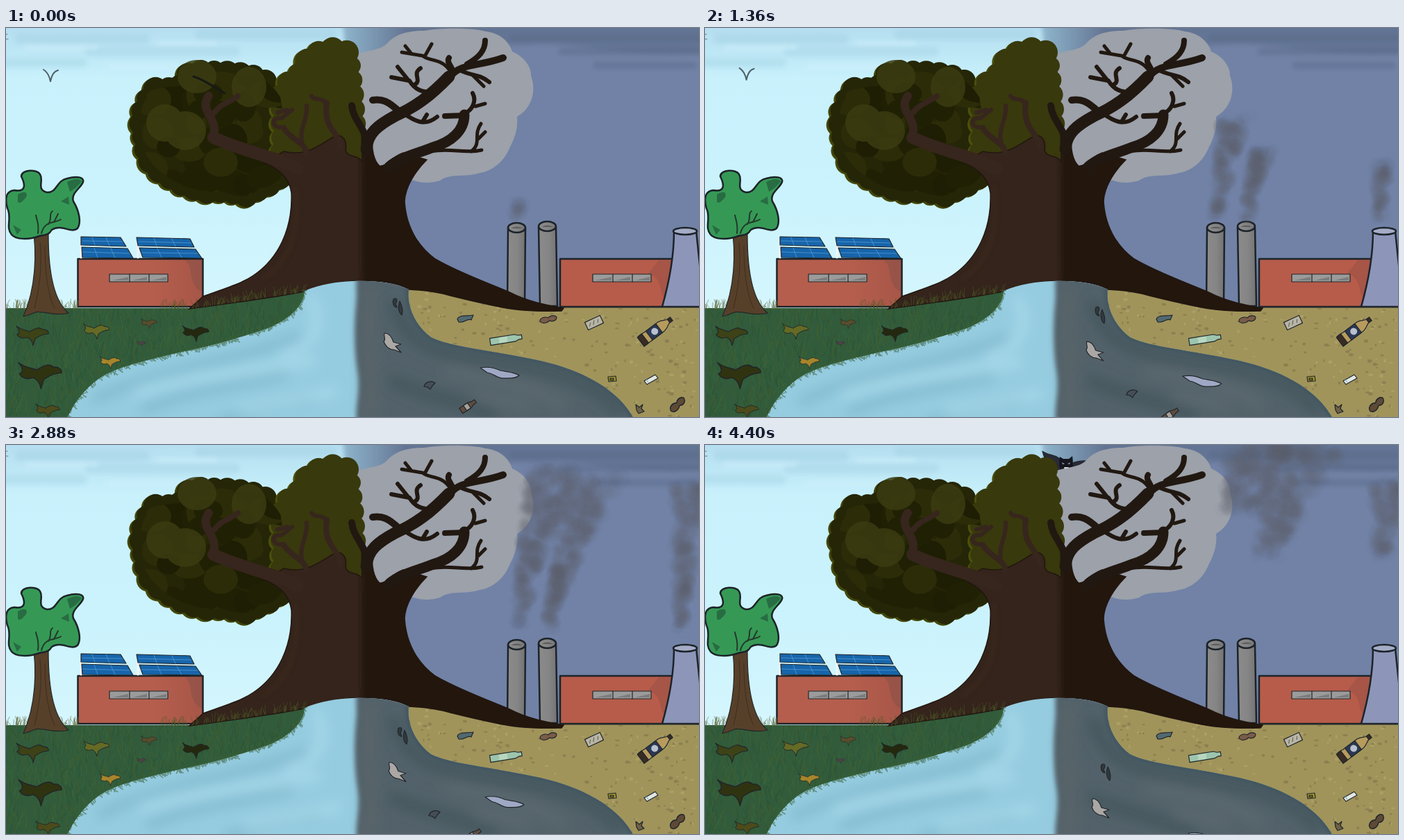
These frames come from a looping animation (998x561 px, 4.48 s). An HTML page with a canvas:

```html
<!DOCTYPE html>
<html lang="en">
<head>
<meta charset="utf-8">
<title>Two sides of a river</title>
<style>
html, body { margin: 0; width: 100%; height: 100%; overflow: hidden; background: #c9f3fd; }
svg, canvas { position: absolute; left: 0; top: 0; width: 998px; height: 561px; }
.ink { stroke: #1c2329; stroke-width: 2.5; stroke-linejoin: round; }
.thin { stroke: #20262a; stroke-width: 1.2; stroke-linejoin: round; }
.line { fill: none; stroke-linecap: round; stroke-linejoin: round; }
.dark { stroke: #211811; }
.bark { stroke: #37261d; }
</style>
</head>
<body>
<svg viewBox="0 0 998 561">
  <defs>
    <filter id="soft" filterUnits="userSpaceOnUse" x="-40" y="-40" width="1080" height="640"><feGaussianBlur stdDeviation="3"/></filter>
    <filter id="haze" filterUnits="userSpaceOnUse" x="-40" y="-40" width="1080" height="640"><feGaussianBlur stdDeviation="9"/></filter>
    <linearGradient id="day" x2="0" y2="1">
      <stop offset="0" stop-color="#b5def0"/><stop offset=".13" stop-color="#c8f1fc"/>
      <stop offset=".45" stop-color="#cbf3fd"/><stop offset=".72" stop-color="#d5f6fd"/>
    </linearGradient>
    <linearGradient id="dusk"><stop stop-color="#8fb6cd"/><stop offset="1" stop-color="#667896"/></linearGradient>
    <linearGradient id="brick"><stop offset=".6" stop-color="#b55e4d"/><stop offset="1" stop-color="#a75648"/></linearGradient>
    <linearGradient id="steel"><stop offset="0" stop-color="#8b8b8b"/><stop offset=".55" stop-color="#858585"/><stop offset="1" stop-color="#737375"/></linearGradient>
    <path id="edge" d="M430 379C430 398 412 418 380 432C335 448 290 460 250 468C190 482 160 490 138 503C112 520 96 545 88 563"/>
    <path id="trunk" d="M264 405L284 387C318 375 340 368 356 357C392 333 413 290 411 238C408 216 395 205 372 194L400 178C430 186 450 170 470 158C482 150 492 160 489 176C492 188 505 182 513 192L512 150L528 158C526 175 530 192 538 199C548 200 552 188 572 180L606 190C588 208 575 230 574 250C576 285 592 314 618 333C650 352 690 366 725 381C752 395 780 400 803 404L800 408C760 409 735 407 715 403C690 398 660 391 640 386C620 380 600 378 580 377C560 365 530 364 500 365C475 366 450 372 430 380C380 390 330 396 264 405Z"/>
    <path id="river" d="M430 379C455 369 475 366 500 365C535 364 560 368 580 377C577 400 588 428 612 446C640 460 690 463 770 480C830 494 880 520 904 563H88C96 545 112 520 138 503C160 490 190 482 250 468C290 460 335 448 380 432C412 418 430 398 430 379Z"/>
    <path id="meadow" d="M0 404H264C330 396 380 390 430 379C430 398 412 418 380 432C335 448 290 460 250 468C190 482 160 490 138 503C112 520 96 545 88 563H0Z"/>
    <path id="beach" d="M580 377C600 377 620 380 640 385C690 396 740 406 800 404H998V563H904C880 520 830 494 770 480C690 463 640 460 612 446C588 428 577 400 580 377Z"/>
    <path id="oak" d="M203 100C200 88 225 86 250 84C255 58 290 58 330 66C360 65 380 75 395 100L408 180C405 215 385 230 365 230C345 252 325 238 305 236C270 238 240 222 220 205C203 190 193 170 197 145C191 130 194 115 203 100Z"/>
    <path id="elm" d="M396 96C398 75 425 70 432 50C448 28 475 25 492 36C500 48 498 70 500 100L507 186L396 188Z"/>
    <clipPath id="inTrunk"><use href="#trunk"/></clipPath>
    <clipPath id="inRiver"><use href="#river"/></clipPath>
    <clipPath id="inMeadow"><use href="#meadow"/></clipPath>
    <clipPath id="inBeach"><use href="#beach"/></clipPath>
    <clipPath id="inOak"><use href="#oak"/></clipPath>
    <path id="leaf" d="M-23-13C-14-6-9-8-4-5C3-9 9-13 15-8C20-9 24-5 23-2C15-2 9 2 4 5L1 15C0 8-4 4-8 3C-14 6-20 3-22-1C-17-3-19-8-23-13Z"/>
    <path id="bow" d="M-12 3C-12-3-4-4 0-2C3-6 10-6 12-3C12 2 6 4 2 2C-2 6-9 7-12 3Z"/>
    <g id="windows"><path class="thin" fill="#9b9b9b" d="M149 355H233V366H149Z"/><path class="line thin" d="M178 355V366M206 355V366"/><path d="M153 364L176 359V364ZM182 364L203 359V364ZM210 364L231 359V364Z" fill="#7c7c7c"/></g>
  </defs>

  <!-- sky -->
  <rect width="998" height="561" fill="url(#day)"/>
  <g filter="url(#soft)">
    <path fill="#7182a6" d="M484 30L560-20H1020V420H500Z"/>
    <path fill="#5d6f8e" d="M570-20H1020V34C900 44 820 20 760 24L570 30Z" opacity=".7"/>
    <path fill="url(#dusk)" d="M484-20H572V48H490Z"/>
    <path class="line" stroke="#536482" stroke-width="10" opacity=".4" d="M730 14H1000M800 34H1010M850 54H990"/>
    <path class="line" stroke="#96c6da" stroke-width="14" opacity=".3" d="M20 16H200M120 34H330M280 10H470M-10 50H110"/>
    <path class="line" stroke="#daf6fd" stroke-width="6" opacity=".4" d="M30 28H130M220 22H300M150 56H260"/>
  </g>
  <path class="line" stroke="#6b7b82" d="M0 9H2M0 16H3"/>

  <g id="peeker">
    <path class="thin" fill="#292a37" d="M486 9C496 16 505 13 512 21L512 48L496 42ZM527 27C536 23 546 22 555 24L546 48H520Z"/>
    <path fill="#15161d" d="M511 17L516 20H524L529 16C531 28 530 40 520 42C510 40 509 28 511 17Z"/>
    <path fill="#8f97a8" d="M514 25L518 27L515 28ZM526 25L522 27L525 28Z"/>
    <path fill="#eee" d="M517 32H524L522 35H518Z"/>
  </g>

  <!-- factories -->
  <rect class="ink" x="103.500" y="333" width="180" height="69" fill="url(#brick)"/>
  <path fill="#8b5148" opacity=".55" d="M258 335C270 345 262 360 275 376L282 380V335Z"/>
  <use href="#windows"/>
  <path class="line" stroke="#f4f4f4" stroke-width="3" d="M108 304V331M190 304V331"/>
  <path class="thin" fill="#1765ab" d="M108 301L165 302L173 315L108 313ZM109 316L175 318L183 332L110 331ZM188 302L265 304L271 316L190 314ZM192 317L273 319L282 332L197 331Z"/>
  <path class="line" stroke="#63abdf" opacity=".6" d="M110 307L168 308M110 323L178 325M191 308L267 310M195 324L276 325M124 302L128 313M144 302L149 314M127 317L132 331M151 318L157 331M213 303L217 314M239 304L244 315M218 318L224 331M246 319L253 331"/>

  <g class="ink" fill="url(#steel)">
    <path d="M723 288L722 400H747L748 288Z"/><ellipse cx="735.500" cy="288" rx="12.500" ry="7"/>
    <path d="M767 287L769 401H794L792 287Z"/><ellipse cx="779.500" cy="286" rx="12.500" ry="7"/>
  </g>
  <path fill="#5e5e60" d="M728 289A8 4 0 0 1 743 289ZM772 287A8 4 0 0 1 787 287Z"/>
  <rect class="ink" x="798" y="333" width="166" height="69" fill="#b75c4a"/>
  <path fill="#9b5047" opacity=".6" d="M940 335H958L948 390C940 380 946 360 925 354Z"/>
  <use href="#windows" x="696"/>
  <path class="ink" fill="#8d96b9" d="M962 293C962 330 954 370 945 402H1002V370L994 293Z"/>
  <ellipse class="ink" cx="978" cy="293" rx="17" ry="5" fill="#a5acc6"/>

  <!-- crowns -->
  <path fill="#9ca1aa" d="M506 37C525 31 540 32 549 22C563 6 585 4 602 4C630-1 675 0 691 5C711 7 725 20 729 34C748 42 757 58 756 69C764 90 758 115 736 128C738 146 731 162 726 171C718 193 699 207 682 209C660 216 640 209 625 220C609 225 590 224 575 214L515 205Z"/>
  <g id="crown"></g>
  <g id="foliage" clip-path="url(#inOak)"></g>
  <g fill="#3b3c11" opacity=".85">
    <ellipse cx="258" cy="148" rx="30" ry="28"/><ellipse cx="229" cy="137" rx="27" ry="27"/>
    <ellipse cx="275" cy="70" rx="28" ry="24"/><ellipse cx="350" cy="85" rx="25" ry="29"/>
  </g>

  <!-- ground -->
  <use href="#meadow" fill="#315b3b"/>
  <g id="blades" clip-path="url(#inMeadow)"></g>
  <use href="#beach" fill="#a0945b" stroke="#a0945b" stroke-width="2"/>
  <g id="grit" clip-path="url(#inBeach)"></g>
  <path class="line" stroke="#22282c" stroke-width="2" d="M798 402.500H998"/>

  <!-- great tree -->
  <use href="#trunk" fill="#34241b" stroke="#221611" stroke-width="1.500"/>
  <g clip-path="url(#inTrunk)">
    <path class="line" stroke="#452e24" stroke-width="5" filter="url(#soft)" opacity=".5" d="M416 230C423 290 412 335 370 362"/>
    <path filter="url(#soft)" fill="#211811" d="M512 100H820V420H513Z"/>
  </g>
  <g class="line bark">
    <path stroke-width="18" d="M420 203C390 186 340 178 299 158"/>
    <path stroke-width="12" d="M298 156C308 130 276 120 292 98"/>
    <path stroke-width="8" d="M300 122C310 108 322 108 334 98M432 180C432 165 408 160 400 144M482 172C480 150 456 145 462 108"/>
    <path stroke-width="6" d="M426 164C422 145 435 132 433 112M400 143C380 145 382 128 397 130L412 118M391 122L405 118M462 110C455 98 444 106 440 98"/>
  </g>
  <g class="line dark">
    <path stroke-width="17" d="M519 175C520 152 536 140 560 127C590 114 612 97 638 70"/>
    <path stroke-width="15" d="M552 200C568 186 590 182 615 172C642 164 660 148 660 125"/>
    <path stroke-width="10" d="M640 70C655 50 680 56 716 43M568 122C550 105 542 102 528 104M521 165C514 140 500 132 498 112"/>
    <path stroke-width="8" d="M664 52C682 42 690 32 690 18M640 70C650 58 632 52 638 43M661 126L632 127"/>
    <path stroke-width="6" d="M622 90C600 96 588 88 581 76L555 71M580 76L564 56M588 82C600 76 584 66 597 58M574 124C594 138 606 140 621 128M600 135L606 125M652 60C670 70 680 65 696 78M660 124C672 118 678 105 672 94"/>
    <path stroke-width="5" d="M638 60C628 44 608 48 600 40L570 35M603 41L613 23M583 36L575 26M676 113L690 109M672 68L688 84M612 178C640 172 660 182 685 176M670 178C686 165 672 155 684 138M680 160L690 150"/>
  </g>

  <!-- river -->
  <use href="#river" fill="#96cce0"/>
  <g clip-path="url(#inRiver)">
    <g id="ripples" filter="url(#haze)" class="line">
      <path stroke="#73aec2" stroke-width="15" opacity=".55" d="M130 535C220 490 320 485 420 445M200 550C270 520 340 515 400 500M310 570C350 550 390 540 440 535"/>
      <path stroke="#aadced" stroke-width="15" opacity=".7" d="M440 390C460 430 440 460 400 470M190 525C270 500 330 500 440 480M340 550L470 525"/>
    </g>
    <path filter="url(#soft)" fill="#52626a" d="M504 350H920V580H507C500 550 511 530 507 500C500 460 502 420 505 390Z"/>
    <path class="line" filter="url(#haze)" stroke="#5b6669" stroke-width="20" opacity=".7" d="M526 380C518 440 530 500 524 560"/>
    <g filter="url(#haze)" class="line">
      <path stroke="#41545c" stroke-width="18" opacity=".8" d="M560 400C575 450 610 470 700 480C780 492 840 505 880 550M560 510C600 530 650 535 700 560"/>
      <path stroke="#667479" stroke-width="14" opacity=".4" d="M640 495C700 505 760 515 800 545M680 530L750 545"/>
    </g>
    <path class="line" filter="url(#soft)" stroke="#40555f" stroke-width="8" d="M580 377C577 400 588 428 612 446C640 460 690 463 770 480C830 494 880 520 904 563"/>
    <g id="drift" class="thin">
      <path fill="#32393d" d="M558 391C564 388 564 394 561 398L563 403C558 402 556 397 558 391ZM567 394C571 402 572 408 570 414C565 410 564 402 567 394Z"/>
      <path fill="#aaa7a5" d="M545 440C552 440 556 447 558 453L569 456L561 459L569 468L559 464C552 464 546 459 544 452C548 449 543 444 545 440Z"/>
      <path fill="#9fa8c4" d="M683 490C695 488 704 490 712 494C722 496 732 496 739 501C734 506 724 505 717 505C708 506 702 498 693 497Z"/>
      <path fill="#454e57" d="M602 517C604 510 612 508 618 512L614 516L611 521L607 518Z"/>
      <g transform="translate(665 545) rotate(-34)"><path fill="#5f4d41" d="M-12-4H3L8-2H13V3H8L3 5H-12Z"/><path fill="#a6a19a" d="M-5-4H2V5H-5Z"/></g>
    </g>
  </g>
  <g id="fringe" class="line"></g>

  <!-- small tree -->
  <path class="thin" fill="#57402a" d="M38 282C45 325 43 375 25 416C37 414 43 407 49 410C58 409 72 416 90 411C68 393 61 350 61 298L67 288L56 294Z"/>
  <path class="line" stroke="#3d2d1e" d="M49 310C53 345 47 380 41 404M56 315C56 350 60 385 70 404"/>
  <path fill="#359955" class="ink" d="M22 214C22 204 45 203 49 211C55 220 43 233 59 237C74 238 72 220 88 217C102 213 113 215 111 222C108 231 93 238 97 250C105 263 109 280 103 289C94 297 80 282 66 291C61 300 54 298 48 300C32 306 14 305 8 298C-1 288 9 273 2 260C-2 246 0 235 12 234C29 237 28 226 22 214Z"/>
  <path fill="#286c43" d="M88 222C98 217 106 217 109 221C102 230 96 234 92 236ZM17 240C27 234 32 237 29 244C24 250 20 254 17 251ZM79 250L90 243L91 255ZM10 284L22 291L16 298Z"/>
  <path class="line" stroke="#24382b" stroke-width="2" d="M46 296C48 282 44 276 43 270M51 296C56 277 70 282 79 276M61 283C67 274 61 268 67 264M69 280L75 268"/>

  <!-- fallen leaves -->
  <g class="thin">
    <use href="#leaf" fill="#3d4217" transform="translate(38 443)"/>
    <use href="#leaf" fill="#656a25" transform="translate(130 437) scale(.8)"/>
    <use href="#leaf" fill="#594d2b" transform="translate(206 426) scale(.5)"/>
    <use href="#leaf" fill="#24280e" transform="translate(273 440) scale(.83)"/>
    <use href="#leaf" fill="#51414a" transform="translate(195 455) scale(.28)"/>
    <use href="#leaf" fill="#a7852b" transform="translate(150 482) scale(.63)"/>
    <use href="#leaf" fill="#303310" transform="translate(49 500) scale(1.34)"/>
    <use href="#leaf" fill="#4c4b1b" transform="translate(60 552) scale(.75)"/>
  </g>

  <!-- beach litter -->
  <g class="thin">
    <path fill="#52696f" d="M650 420C652 413 665 416 673 414L670 421C664 418 661 426 652 424Z"/>
    <use href="#bow" fill="#795b48" x="781" y="420"/>
    <use href="#bow" fill="#5d4936" transform="translate(967 543) rotate(-28) scale(1.050 1.300)"/>
    <g transform="translate(847 425) rotate(-25)"><path fill="#b8b5a6" d="M-12-6H12V6H-12Z"/><path class="line" stroke="#66645d" d="M-8 2L-5-2M-2 2L1-3M5 2L7-2"/></g>
    <g transform="translate(720 449) rotate(-9)"><path fill="#9dc5ae" d="M-23-5H13L18-3H23V3H18L13 5H-23Z"/><path fill="#b8d7bf" stroke="none" d="M-10-4H2V4H-10Z"/></g>
    <g transform="translate(935 437) rotate(-37)">
      <path fill="#b79b5d" d="M-26-8C-21-10-16-8-13-8H11C17-7 20-4 23-3H29V3H23C20 4 17 7 11 8H-26Z"/>
      <path fill="#392c24" d="M-26-8H-18V8H-26ZM24-3H29V3H24Z"/><path fill="#2c3853" d="M-11-8H7V8H-11Z"/>
      <circle r="5" cx="-1" fill="#b9c0ce" stroke="none"/>
    </g>
    <path fill="#a9982d" d="M867 503L878 502L879 509L868 510Z"/><path fill="#776b24" d="M870 505H875V508H870Z"/>
    <path fill="#e3e7e4" d="M919 509L935 500L939 505L923 514Z"/><path stroke="#70b5bd" d="M925 511L922 507"/>
    <path fill="#6c6046" d="M907 543L912 547L917 543L915 549L919 553L911 556L908 551Z"/>
  </g>

  <!-- flyers; data-show holds the first and last moment in ms -->
  <g class="line" stroke="#171a15">
    <path id="gull" data-show="-400 2080" stroke="#4e6067" stroke-width="2" d="M-10-9C-5-6-2-2 0 8C2-2 6-7 11-8"/>
    <path data-show="-400 480" stroke-width="3" d="M270 70C285 74 300 86 315 94"/>
    <path data-show="1520 2000" stroke-width="2" d="M260 60C275 66 290 72 305 85"/>
    <path data-show="480 1280" stroke-width="3" d="M275 82C292 78 302 85 312 97C320 84 332 78 348 74"/>
    <path data-show="640 1280" stroke="#28343b" stroke-width="2" d="M165 305C172 307 176 309 179 312C184 295 196 275 208 267M180 313C190 290 205 275 225 269"/>
  </g>
  <path data-show="1600 2560" fill="#15171b" d="M6 88C18 100 30 102 36 112L40 115L44 110C52 100 66 97 78 99C66 103 54 108 46 120L40 124L33 118C24 108 14 104 6 88Z"/>
  <path data-show="1540 2560" fill="#14150c" d="M221 135C235 142 248 146 254 153L262 151C285 132 320 122 348 122C318 130 290 138 264 160L256 165L247 157C238 150 228 146 221 135Z"/>
  <circle data-show="2000 2480" cx="139" cy="308" r="2" fill="#15213a"/>
  <path id="bat" class="thin" fill="#17191e" d="M64 513C91 525 114 538 130 561L134 556L138 559H153L160 555L163 562C188 538 222 524 257 512C241 528 224 545 208 580H98C94 548 78 531 64 513Z"/>
</svg>
<canvas width="998" height="561"></canvas>
<script>
const LOOP = 4480, TICK = 80, HELD = [18, 33, 48];
const $ = id => document.getElementById(id);
const add = (id, html) => $(id).insertAdjacentHTML('beforeend', html);
const clamp = v => Math.max(0, Math.min(1, v));

let seed = 7;
const rnd = () => (seed = (seed * 16807) % 2147483647) / 2147483647;
const span = (a, b) => a + (b - a) * rnd();
const pick = list => list[Math.floor(rnd() * list.length)];
const blob = (x, y, rx, ry, fill) => `<ellipse cx="${x}" cy="${y}" rx="${rx}" ry="${ry}" fill="${fill}"/>`;

// Fills a shape and sets round lobes along its outline.
function lobes(id, fill, rim, gap) {
  const path = $(id), end = path.getTotalLength();
  let back = '', front = '';
  for (let s = 0; s < end; s += gap) {
    const { x, y } = path.getPointAtLength(s), r = span(13, 18);
    back += blob(x - 3, y + 2, r, r, rim);
    front += blob(x, y, r, r, fill);
  }
  add('crown', back + `<use href="#${id}" fill="${fill}"/>` + front);
}
lobes('oak', '#252607', '#43470b', 19);
lobes('elm', '#38390c', '#4b500c', 21);
for (let i = 0; i < 45; i++) {
  add('foliage', blob(span(190, 400), span(60, 245), span(14, 30), span(14, 25), pick(['#1d1e03', '#202104', '#2c2d08'])));
}

function grass(id, color, count, width, place) {
  let d = '';
  for (let i = 0; i < count; i++) {
    const [x, y, h, lean] = place();
    d += `M${x} ${y}q${lean * .2} ${-h * .6} ${lean} ${-h}`;
  }
  add(id, `<path class="line" d="${d}" stroke="${color}" stroke-width="${width}" opacity=".55"/>`);
}
const field = () => [span(0, 430), span(405, 570), span(8, 20), span(-7, 7)];
for (const color of ['#284f32', '#4c5d25', '#3b6b3c']) grass('blades', color, 420, 1.1, field);

const edge = $('edge'), shore = edge.getTotalLength();
const bank = () => {
  const p = edge.getPointAtLength(rnd() * shore);
  return [p.x + span(-4, 1), p.y + span(-3, 1), span(-6, 4), span(-3, 6)];
};
grass('fringe', '#385f38', 420, 1.6, bank);
const rim = (a, b) => () => {
  const x = span(a, b);
  return [x, 405 - Math.max(0, x - 264) * .15, span(4, 14), span(-5, 6)];
};
grass('fringe', '#62683b', 90, 1, rim(0, 105));
grass('fringe', '#4d5927', 110, 1, rim(220, 430));

for (let i = 0; i < 320; i++) {
  add('grit', blob(span(580, 998), span(380, 561), span(1, 3.5), span(1, 2.5), pick(['#8c8050', '#8c8050', '#aca066'])));
}

// Smoke rises from (x, y), leaning and widening with height; the oldest part clears from below.
const plumes = [
  { x: 736, y: 280, lean: 70, spread: 46, top: 285, count: 260, start: -150, clear: 150 },
  { x: 780, y: 280, lean: 95, spread: 46, top: 285, count: 260, start: 640, clear: 70 },
  { x: 972, y: 280, lean: 15, spread: 18, top: 225, count: 150, start: 860, clear: 70 }
];
for (const p of plumes) {
  p.puffs = Array.from({ length: p.count }, () => {
    const u = rnd() ** .75, s = u * p.top, half = 7 + p.spread * u ** 1.8;
    return { s, x: p.x + p.lean * u ** 1.4 + span(-half, half), y: p.y - s, r: span(7, 14) + 4 * u };
  });
}

const ctx = document.querySelector('canvas').getContext('2d');
const puff = document.createElement('canvas');
puff.width = puff.height = 64;
const pen = puff.getContext('2d'), glow = pen.createRadialGradient(32, 32, 2, 32, 32, 32);
glow.addColorStop(0, '#60626c');
glow.addColorStop(.5, '#60626cb0');
glow.addColorStop(1, '#60626c00');
pen.fillStyle = glow;
pen.fillRect(0, 0, 64, 64);

function smoke(t) {
  ctx.clearRect(0, 0, 998, 561);
  for (const { start, clear, puffs } of plumes) {
    const head = 300 * clamp((t - start) / (3760 - start)) ** .7;
    const tail = Math.min(180, Math.max(0, (t - 2750) / 1000 * clear)) - 20 * (t < 2750);
    for (const { s, x, y, r } of puffs) {
      ctx.globalAlpha = .17 * clamp((head - s) / 16) * clamp((s - tail) / 20);
      ctx.drawImage(puff, x - r, y - r, 2 * r, 2 * r);
    }
  }
}

const move = (id, x, y) => $(id).setAttribute('transform', `translate(${x} ${y})`);
const flyers = [...document.querySelectorAll('[data-show]')];

function draw(t) {
  for (const el of flyers) {
    const [from, to] = el.dataset.show.split(' ').map(Number);
    el.setAttribute('opacity', clamp(Math.min(t - from, to - t) / 240));
  }
  const u = t / 960, arc = 17.3 * u - 13.3 * u * u;
  move('gull', 64 + 2 * arc, 69 + arc);
  move('bat', 0, 60 - 60 * Math.sin(Math.PI * clamp((t - 1920) / 700)));
  move('peeker', 0, 44 * (1 - clamp((t - 4000) / 400)));

  const float = Math.sqrt(clamp(t / 3760)), rush = clamp((t - 3760) / 640);
  move('drift', 8 * float + 5 * rush, 20 * float + 50 * rush);
  move('ripples', 6 - 6 * Math.cos(t / LOOP * 4 * Math.PI), 3 * Math.sin(t / LOOP * 2 * Math.PI));
  smoke(t);
}

let shown = -1;
function frame() {
  let step = Math.floor(performance.now() % LOOP / TICK);
  if (HELD.includes(step)) step--;
  if (step !== shown) draw((shown = step) * TICK);
  requestAnimationFrame(frame);
}
frame();
</script>
</body>
</html>
```
